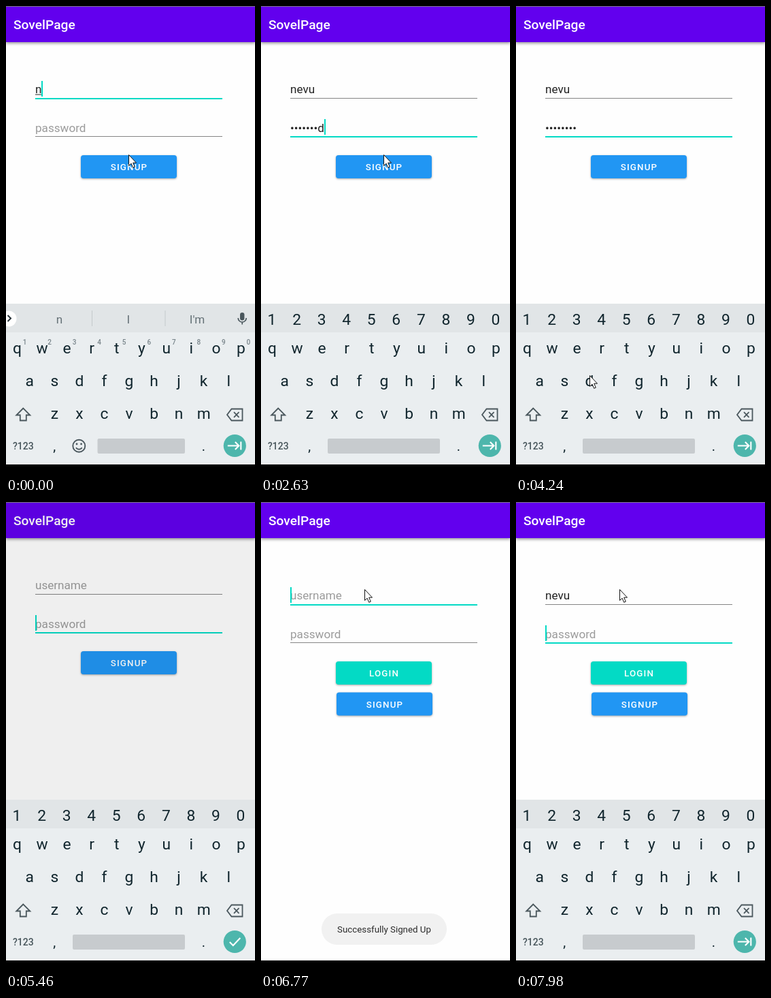
These frames come from a looping animation (366 by 687 pixels, 8000 ms). An HTML page with a canvas:

```html
<!DOCTYPE html>
<html lang="en">
<head>
<meta charset="utf-8">
<title>Sign up and log in</title>
<style>
  html, body { margin: 0; width: 100%; height: 100%; overflow: hidden; background: #fefefe; }
  canvas { display: block; width: 366px; height: 687px; }
</style>
</head>
<body>
<canvas></canvas>
<script>
const W = 366, H = 687, LOOP = 8000;
const TEAL = '#03dac5', BLUE = '#2196f3', INK = '#10252d', ICON = '#4a575d';
const canvas = document.querySelector('canvas');
const c = canvas.getContext('2d');
const dpr = window.devicePixelRatio || 1;
canvas.width = W * dpr;
canvas.height = H * dpr;

// Moments of the story, in ms
const TO_PASS = 1110, SUBMIT = 5310, DIM = 5460, LOGIN = 5580, TAP = 6650, KEYS = 6850, TO_PASS_2 = 7980;
const NAME = 'nevu', SECRET = 'password';
const HINTS = [['thanks', 'I', 'we'], ['n', 'I', "I'm"], ['ne', 'new', 'next'],
  ['nev', 'never', 'new'], ['nevu', 'never', 'networks']];

// Key presses: evenly paced bursts
const burst = (start, pace, n) => Array.from({ length: n }, (_, i) => start + pace * i);
const NAME_KEYS = [-190, ...burst(560, 135, 3)];
const PASS_KEYS = [...burst(1420, 138, 6), ...burst(2510, 120, 2)];
const LOGIN_KEYS = burst(7310, 130, 4);
const INPUTS = [...NAME_KEYS, ...PASS_KEYS, ...LOGIN_KEYS, TO_PASS, SUBMIT, TAP, TO_PASS_2];

const past = (times, t) => times.filter(k => k <= t);
const ramp = (t, a, b) => Math.min(1, Math.max(0, (t - a) / (b - a)));
const settle = (t, a, b, power) => (1 - ramp(t, a, b)) ** power;

function stateAt(t) {
  const login = t >= LOGIN;
  const nameCount = login ? past(LOGIN_KEYS, t).length
    : t < SUBMIT ? past(NAME_KEYS, t).length : 0;
  const count = t < SUBMIT ? past(PASS_KEYS, t).length : 0;
  const masked = Math.max(count - 1, past(PASS_KEYS, t - 1500).length);
  const onPass = login ? t >= TO_PASS_2 : t >= TO_PASS;
  return {
    login, nameCount, onPass,
    onName: !onPass && (!login || t >= TAP),
    secret: count ? '•'.repeat(masked) + SECRET.slice(masked, count) : '',
    // The caret restarts its blink at every input
    caret: Math.floor((t - Math.max(...past(INPUTS, t))) / 500) % 2 === 0,
    dim: t >= DIM && !login,
    done: t >= SUBMIT && !login,
    pageDrop: login ? 12 * settle(t, LOGIN, 5850, 3) : 0,
    keysDrop: login ? 240 * settle(t, KEYS, 7160, 5) : 0,
    toast: ramp(t, 5500, 5730) - ramp(t, 7200, 7580),
    pointer: pointerAt(t)
  };
}

function glide(t, start, end, from, to) {
  const p = Math.floor((t - start) / 130) * 130 / (end - start);
  return from.map((v, i) => v + (to[i] - v) * ramp(p, 0, 1));
}

function pointerAt(t) {
  const rest = [181, 218], corner = [241, 240];
  if (t < 3190) return rest;
  if (t < 3710) return glide(t, 3190, 3710, rest, corner);
  if (t < 4230) return glide(t, 3710, 4100, corner, [291, 578]);
  if (t < 4630) return glide(t, 4230, 4490, [109, 542], [113, 565]);
  return t < 6530 ? null : [153, 128];
}

function rect(x, y, w, h, color, r = 0) {
  c.fillStyle = color;
  c.beginPath();
  c.roundRect(x, y, w, h, r);
  c.fill();
}

function disc(x, y, r, color) {
  c.fillStyle = color;
  c.beginPath();
  c.arc(x, y, r, 0, 7);
  c.fill();
}

function text(s, x, y, size, color, align = 'left', weight = 400, spacing = 0) {
  c.font = `${weight} ${size}px Roboto, sans-serif`;
  c.letterSpacing = spacing + 'px';
  c.textAlign = align;
  c.fillStyle = color;
  c.fillText(s, x, y);
  return c.measureText(s).width;
}

function stroke(d, x, y, color, width = 2) {
  c.save();
  c.translate(x, y);
  c.strokeStyle = color;
  c.lineWidth = width;
  c.stroke(new Path2D(d));
  c.restore();
}

function shadowed(blur, dy, alpha, draw) {
  c.save();
  c.shadowColor = `rgba(0,0,0,${alpha})`;
  c.shadowBlur = blur * dpr;
  c.shadowOffsetY = dy * dpr;
  draw();
  c.restore();
}

function field(base, value, hint, focused, caret, composing) {
  const width = value ? text(value, 43, base, 17.1, '#222') : 0;
  const line = Math.floor(base + 7);
  if (!value) text(hint, 43, base, 17.1, '#9b9b9b');
  if (composing) rect(43, base + 1.5, width, 1, '#222');
  rect(43, line, 275, focused ? 2 : 1, focused ? TEAL : '#858585');
  if (focused && caret) rect(Math.round(43 + width), line - 25, 2, 23, TEAL);
}

function button(x, y, label, color) {
  shadowed(3, 1, 0.35, () => rect(x, y, 141, 34, color, 4));
  text(label, x + 71, y + 22, 13.3, '#fff', 'center', 500, 1.19);
}

function page(s) {
  const base = s.login ? 143 : 128;
  c.save();
  c.translate(0, s.pageDrop);
  rect(0, 0, W, H, '#fefefe');
  shadowed(4, 1.5, 0.4, () => rect(0, 1, W, 52, '#6200ee'));
  text('SovelPage', 11, 34, 19.2, '#fff', 'left', 500);
  field(base, NAME.slice(0, s.nameCount), 'username', s.onName, s.caret, s.onName);
  field(base + 56.5, s.secret, 'password', s.onPass, s.caret);
  if (s.login) button(110, 234, 'LOGIN', TEAL);
  button(s.login ? 111 : 110, s.login ? 279.5 : 219, 'SIGNUP', BLUE);
  c.restore();
  if (s.dim) rect(0, 1, W, H, 'rgba(0,0,0,.06)');
}

function row(chars, x, y) {
  [...chars].forEach((ch, i) => text(ch, x + 36.55 * i, y, 22.8, INK, 'center'));
}

function suggestions(words) {
  disc(4, 459, 11.5, '#fff');
  stroke('M-2 -4.5L2.5 0L-2 4.5', 4.5, 458.5, '#263238');
  words.forEach((w, i) => text(w, 78.5 + 101.3 * i, 465.5, 17.1, '#657177', 'center'));
  for (const x of [126, 233.5]) rect(x, 447, 1, 23, '#c4c9cc');
  rect(344, 450, 6.4, 11.5, ICON, 3.2);
  stroke('M-6 0A6 6 0 0 0 6 0M0 6V9.5', 347.2, 458, ICON, 1.7);
}

function emojiKey(x, y) {
  stroke('M9 0A9 9 0 1 1 -9 0A9 9 0 1 1 9 0M-4.5 2.5Q0 7.5 4.5 2.5', x, y, ICON, 1.9);
  for (const side of [-1, 1]) disc(x + 3.3 * side, y - 2.8, 1.4, ICON);
}

function keyboard(s) {
  const digits = '1234567890', left = s.onPass ? 98 : 134.5;
  c.save();
  c.beginPath();
  c.rect(0, 0, W, 673);
  c.clip();
  c.translate(0, s.keysDrop);
  rect(0, 437, W, 240, '#eaeef0');
  rect(0, 437, W, 42, '#e1e5e7');
  if (s.onPass) {
    row(digits, 16, 468);
  } else {
    suggestions(HINTS[s.nameCount]);
    [...digits].forEach((d, i) =>
      text(d, 27.5 + 36.55 * i, 496.5, 10, '#78848a', 'center', 500));
    emojiKey(107.3, 645.8);
  }
  ['qwertyuiop', 'asdfghjkl', 'zxcvbnm'].forEach((keys, i) =>
    row(keys, 181 - 36.55 * (keys.length - 1) / 2, 510 + 48 * i));
  stroke('M0 -9L-10 1H-4.5V9H4.5V1H10Z', 25.3, 599.5, ICON, 1.8);
  stroke('M-11.5 0L-5 -8.5H11V8.5H-5ZM-1.5 -3.8L6 3.8M6 -3.8L-1.5 3.8', 336.5, 600, ICON, 1.8);
  text('?123', 10, 651, 14, '#47555b', 'left', 500);
  text(',', 71.3, 653, 20, INK, 'center');
  text('.', 290.5, 653, 20, INK, 'center');
  rect(left, 635, 263 - left, 22, '#c7cbce', 2);
  disc(336.3, 645.5, 16.6, '#4db6ac');
  stroke(s.done ? 'M-7.5 0.5L-2.5 5.5L8 -5.5' : 'M-10.5 0H6M0.5 -5.5L6 0L0.5 5.5M9 -6V6',
    336.3, 645.5, '#fff', 2.1);
  c.restore();
}

function toast(alpha) {
  c.save();
  c.globalAlpha = alpha;
  rect(89, 604, 184, 46, '#f1f1f1', 23);
  text('Successfully Signed Up', 181, 632, 13.3, '#2b2b2b', 'center');
  c.restore();
}

function pointer(pos) {
  if (!pos) return;
  c.save();
  c.translate(pos[0] - 0.5, pos[1] + 0.5);
  const arrow = new Path2D('M0 0V16L3.6 12.7L6.2 18.8L8.8 17.7L6.2 11.7H11Z');
  c.fillStyle = '#fff';
  c.fill(arrow);
  c.strokeStyle = '#111';
  c.lineWidth = 1;
  c.stroke(arrow);
  c.restore();
}

function frame() {
  const s = stateAt(performance.now() % LOOP);
  c.setTransform(dpr, 0, 0, dpr, 0, 0);
  page(s);
  keyboard(s);
  toast(s.toast);
  rect(0, 0, W, 1, '#777');
  rect(0, 673, W, 14, '#000');
  pointer(s.pointer);
  requestAnimationFrame(frame);
}
frame();
</script>
</body>
</html>
```
